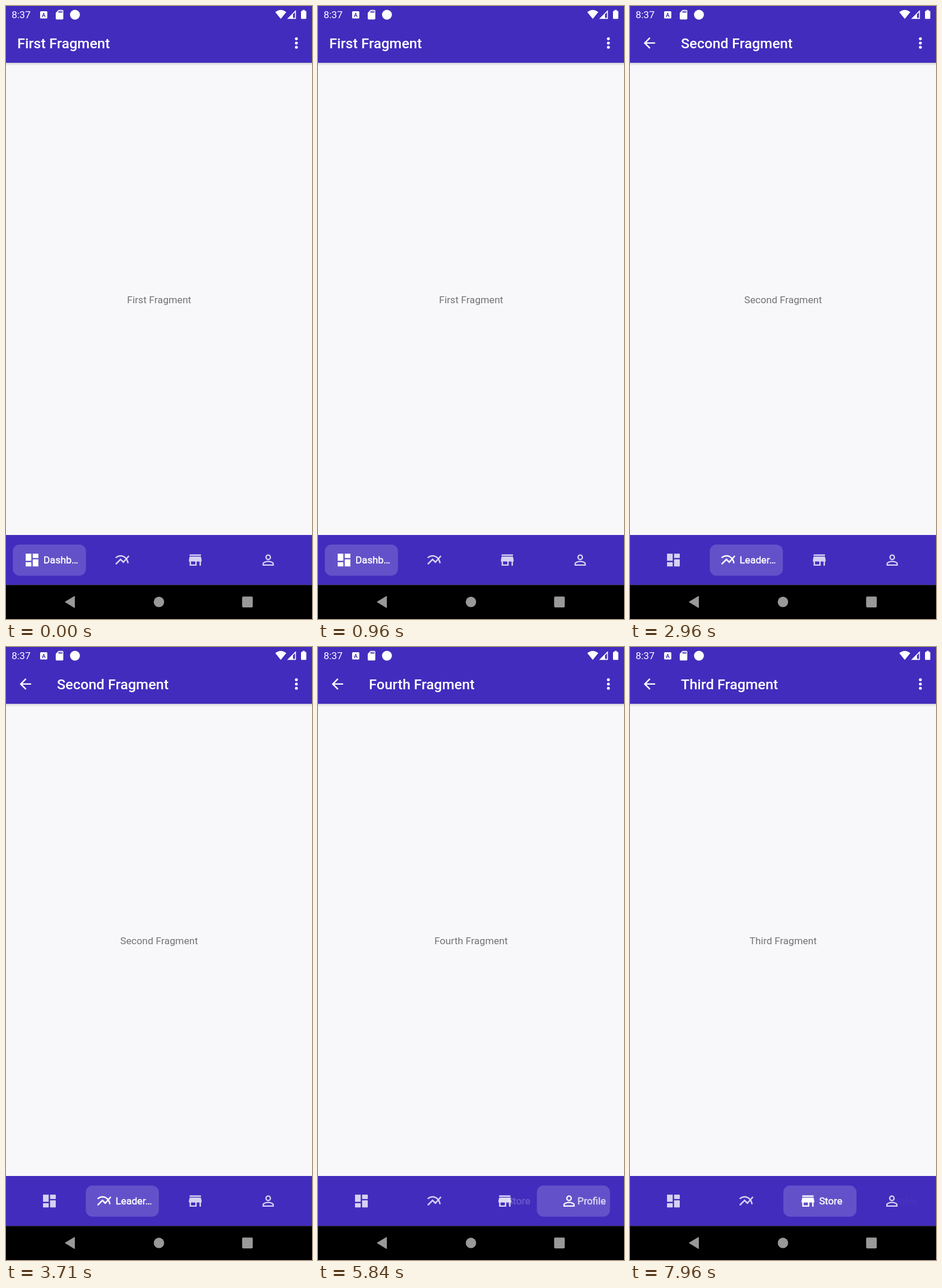
Recreate the animation shown at these times as an HTML page. Size 529 by 1058 pixels, loop 8000 ms.

```html
<!DOCTYPE html>
<html lang="en">
<head>
<meta charset="utf-8">
<title>Bottom bar</title>
<style>
  html, body { margin: 0; width: 100%; height: 100%; overflow: hidden; background: #f8f8fb; }
  svg { display: block; width: 100%; height: 100%; font-family: Roboto, sans-serif; }
  .tab text { font-size: 17.15px; text-anchor: middle; fill: #fff; stroke: #fff; stroke-width: .45px; }
</style>
</head>
<body>
<svg id="stage" viewBox="0 0 529 1058">
  <defs>
    <linearGradient id="shade" x2="0" y2="1">
      <stop offset="0" stop-color="#000" stop-opacity=".16"/>
      <stop offset="1" stop-color="#000" stop-opacity="0"/>
    </linearGradient>
  </defs>
  <rect width="529" height="1058" fill="#f8f8fb"/>
  <rect y="98" width="529" height="5" fill="url(#shade)"/>
  <rect width="529" height="98" fill="#422cbd"/>
  <rect y="913" width="529" height="86.2" fill="#422cbd"/>
  <rect y="999.2" width="529" height="58.8" fill="#000"/>

  <!-- status bar -->
  <g fill="#fff">
    <text x="9.7" y="21" font-size="17">8:37</text>
    <rect x="59" y="9" width="12.4" height="12.4" rx="1.5"/>
    <text x="65.2" y="18.7" font-size="9.5" font-weight="700" text-anchor="middle" fill="#422cbd">A</text>
    <path transform="translate(82.7 5.2) scale(.82)" d="M18 2h-8L4 8v12c0 1.1.9 2 2 2h12c1.1 0 2-.9 2-2V4c0-1.1-.9-2-2-2zm-6 6h-2V4h2zm3 0h-2V4h2zm3 0h-2V4h2z"/>
    <circle cx="119.2" cy="15" r="8.6"/>
    <path d="M465.5 10.6Q475 3 484.5 10.6L475 22.2z"/>
    <path d="M486 22.2L501.2 7V22.2zM496.2 20.6H499.6V10.8L496.2 14.2z" fill-rule="evenodd"/>
    <path d="M512.6 8.4V6.8h4v1.6h1.6q1 0 1 1V21q0 1.2-1 1.2h-7.2q-1 0-1-1.2V9.4q0-1 1-1z"/>
  </g>

  <!-- app bar -->
  <g fill="#fff">
    <path id="back" transform="translate(18.9 49.2) scale(1.2246)" d="M20 11H7.83l5.59-5.59L12 4l-8 8 8 8 1.41-1.41L7.83 13H20z"/>
    <text id="title" y="73" font-size="24.5" font-weight="500"/>
    <circle cx="502" cy="56.5" r="2.5"/>
    <circle cx="502" cy="63.9" r="2.5"/>
    <circle cx="502" cy="71.3" r="2.5"/>
  </g>

  <text id="body" x="264.7" y="512.6" font-size="17.15" text-anchor="middle" fill="#737373"/>

  <rect id="pill" y="929.6" width="126.4" height="53.6" rx="11.5" fill="#fff" fill-opacity=".176"/>
  <g id="tabs"></g>

  <!-- system keys -->
  <g fill="#999">
    <path d="M102.6 1028.6L118.4 1019V1038.2z" stroke="#999" stroke-width="1.2" stroke-linejoin="round"/>
    <circle cx="264.4" cy="1028.6" r="9"/>
    <rect x="408.2" y="1019.3" width="18.4" height="18.6" rx="1.8"/>
  </g>
</svg>
<script>
const LOOP = 8000, DURATION = 200, LAG = 95;
const LEFT = 11.8, PITCH = 126.1, SCALE = 1.2246, MID = 956.3;

const pages = [
  { name: 'First', label: 'Dashb…', icon: 'M3 13h8V3H3zm0 8h8v-6H3zm10 0h8V11h-8zm0-18v6h8V3z' },
  { name: 'Second', label: 'Leader…', icon: 'M22 6.92l-1.41-1.41-2.85 3.21C15.68 6.4 12.83 5 9.61 5 6.72 5 4.07 6.16 2 8l1.42 1.42C5.12 7.93 7.27 7 9.61 7c2.74 0 5.09 1.26 6.77 3.24l-2.88 3.24-4-4L2 16.99l1.5 1.5 6-6.01 4 4 4.05-4.55c.75 1.35 1.25 2.9 1.44 4.55H21c-.22-2.3-.95-4.39-2.04-6.14z' },
  { name: 'Third', label: 'Store', icon: 'M20 4H4v2h16zm1 10v-2l-1-5H4l-1 5v2h1v6h10v-6h4v6h2v-6h1zm-9 4H6v-4h6z' },
  { name: 'Fourth', label: 'Profile', icon: 'M12 5.9a2.1 2.1 0 1 1 0 4.2a2.1 2.1 0 1 1 0-4.2m0 9c2.97 0 6.1 1.46 6.1 2.1v1.1H5.9V17c0-.64 3.13-2.1 6.1-2.1M12 4C9.79 4 8 5.79 8 8s1.79 4 4 4 4-1.79 4-4-1.79-4-4-4zm0 9c-2.67 0-8 1.34-8 4v3h16v-3c0-2.66-5.33-4-8-4z' }
];

// The new page appears LAG ms after the tap, with the bar already moving.
const taps = [
  { at: 2575, from: 0, to: 1 },
  { at: 4105, from: 1, to: 2 },
  { at: 5702, from: 2, to: 3 },
  { at: 7780, from: 3, to: 2 }
];

const $ = id => document.getElementById(id);
const decelerate = t => 1 - (1 - t) ** 2;
const smooth = t => (1 - Math.cos(Math.PI * t)) / 2;

function add(parent, tag, attrs) {
  const node = document.createElementNS('http://www.w3.org/2000/svg', tag);
  for (const key in attrs) node.setAttribute(key, attrs[key]);
  return parent.appendChild(node);
}

const tabs = pages.map((page, i) => {
  const g = add($('tabs'), 'g', { class: 'tab' });
  const center = LEFT + PITCH * i + 63.2;
  const text = add(g, 'text', { x: center + 19.8, y: 962.2 });
  text.textContent = page.label;
  const icon = add(g, 'path', { d: page.icon, fill: '#fff', 'fill-rule': 'evenodd' });
  return { center, text, icon, shift: text.getComputedTextLength() / 2 };
});

function draw(time) {
  const tap = taps.filter(t => time >= t.at + LAG).pop() || { at: -LOOP, from: 0, to: 0 };
  const t = Math.min(1, (time - tap.at) / DURATION);
  const slot = tap.from + (tap.to - tap.from) * decelerate(t);
  const name = pages[tap.to].name + ' Fragment';

  $('title').textContent = $('body').textContent = name;
  $('title').setAttribute('x', tap.to ? 88 : 19.5);
  $('back').setAttribute('visibility', tap.to ? 'visible' : 'hidden');
  $('pill').setAttribute('x', LEFT + PITCH * slot);

  tabs.forEach((tab, i) => {
    const on = i === tap.to ? smooth(t) : i === tap.from ? 1 - smooth(t) : 0;
    const x = tab.center - tab.shift * on - 12 * SCALE;
    tab.icon.setAttribute('transform', `translate(${x} ${MID - 12 * SCALE}) scale(${SCALE})`);
    tab.icon.setAttribute('opacity', 0.784 + 0.216 * on);
    tab.text.setAttribute('opacity', on);
  });
}

function tick() {
  draw(performance.now() % LOOP);
  requestAnimationFrame(tick);
}
tick();
</script>
</body>
</html>
```
